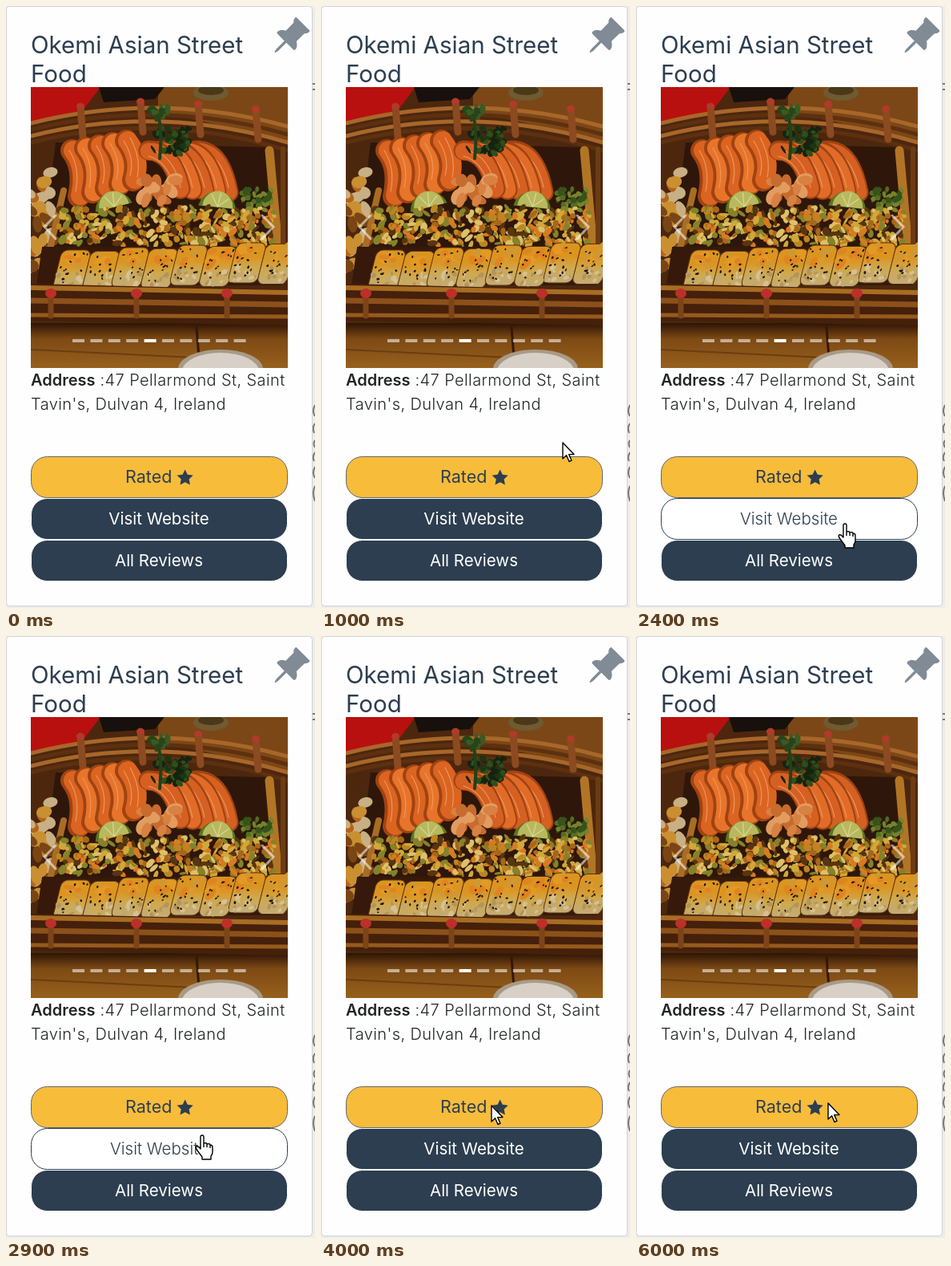
An HTML page for the animation above (7200 ms loop, 386 by 750 pixels).

```html
<!DOCTYPE html>
<html lang="en">
<head>
<meta charset="utf-8">
<title>Restaurant card</title>
<style>
html, body { margin: 0; width: 100%; height: 100%; overflow: hidden; background: #ececec; }
svg { display: block; }
text { font-family: Inter, "Open Sans", sans-serif; font-size: 20.5px; fill: #2c3e50; }
.title { font-size: 29.5px; font-weight: 400; }
.address { font-size: 20px; font-weight: 300; fill: #212529; letter-spacing: .4px; }
.address tspan { font-weight: 600; letter-spacing: 0; }
.btn text { text-anchor: middle; fill: #fff; }
.btn rect { fill: #2c3e50; stroke: #fff; }
.btn.hover text { fill: #2c3e50; font-weight: 300; }
.btn.hover rect { fill: #fff; stroke: #2c3e50; }
</style>
</head>
<body>
<svg width="386" height="750" viewBox="0 0 386 750">
  <defs>
    <clipPath id="frame"><rect x="31" y="101" width="321" height="350"/></clipPath>
    <linearGradient id="table" x2="0" y2="1">
      <stop offset="0" stop-color="#2c1405"/><stop offset=".35" stop-color="#7d4a14"/>
      <stop offset="1" stop-color="#97601c"/>
    </linearGradient>
    <linearGradient id="roll" x2="0" y2="1">
      <stop offset=".35" stop-color="#dc9420"/><stop offset=".62" stop-color="#cfa950"/>
      <stop offset="1" stop-color="#c4ac78"/>
    </linearGradient>
  </defs>

  <path d="M383 97h3M383 104h3M386 497q-4 8 0 14M386 520q-4 5-1 12M386 541q-3 4 0 9M386 556q-4 6-1 11M386 574q-4 8 0 14M386 598q-4 8 0 19"
        fill="none" stroke="#777" stroke-width="2"/>
  <rect x=".5" y=".5" width="382" height="747" rx="4" fill="#fefefe" stroke="#d2d2d2"/>

  <path transform="translate(331.4 11.9) scale(3.14)" fill="#808b96"
        d="M9.8.7Q10 .7 10.2.9L15.1 5.8Q15.4 6.1 15.1 6.5C14.6 7 13.8 7.2 13.2 7.1L10 10.2C10.3 11.2 10.4 12.7 9.5 13.6Q9.1 13.9 8.8 13.6L6 10.8L2.8 14C2.6 14.2 1.6 14.9 1.4 14.7C1.2 14.5 1.9 13.4 2.1 13.2L5.2 10.1L2.4 7.2Q2.1 6.9 2.4 6.5C3.3 5.6 4.8 5.7 5.8 6L8.9 2.8C8.8 2.2 8.9 1.4 9.5.9Q9.6.7 9.8.7Z"/>

  <text class="title" x="31" y="59">Okemi Asian Street</text>
  <text class="title" x="31" y="95">Food</text>

  <g id="photo" clip-path="url(#frame)"></g>
  <g id="controls" fill="#fff"></g>

  <text class="address" x="31" y="473"><tspan>Address</tspan> :47 Pellarmond St, Saint</text>
  <text class="address" x="31" y="503">Tavin's, Dulvan 4, Ireland</text>

  <rect x="31.5" y="561.5" width="320" height="51" rx="20" fill="#f8bc3b" stroke="#5f6670"/>
  <text x="149" y="594" style="font-size:21.5px">Rated</text>
  <path id="star" fill="#2c3e50"/>

  <g class="btn" id="visit">
    <rect x="31.5" y="613.5" width="320" height="51" rx="20"/><text x="191" y="646">Visit Website</text>
  </g>
  <g class="btn" id="reviews">
    <rect x="31.5" y="665.5" width="320" height="51" rx="20"/><text x="191" y="698">All Reviews</text>
  </g>

  <g id="cursor" fill="#fff" stroke="#000" stroke-width="1.4" stroke-linejoin="round">
    <path id="arrow" d="M0 0V20L4.6 15.7L8 23.5L11 22.2L7.7 14.6H14Z"/>
    <path id="hand" d="M1 2Q1 0 3 0T5 2V10Q9 9 9 11Q13 10 13 12Q16 12 16 15V21Q16 24 14 26V30H3V27L-3 19Q-6 15 -4 14Q-2 13 1 17ZM5 10v5M9 11v4M13 12v4"/>
  </g>
</svg>

<script>
const $ = id => document.getElementById(id);
let seed = 7;
const rnd = (a, b) => a + (b - a) * ((seed = seed * 16807 % 2147483647) / 2147483647);
const pick = list => list[Math.floor(rnd(0, list.length))];

const shape = (d, fill) => `<path d="${d}" fill="${fill}"/>`;
const line = (d, color, w, cap = 'round') =>
  `<path d="${d}" fill="none" stroke="${color}" stroke-width="${w}" stroke-linecap="${cap}"/>`;
const oval = (x, y, rx, ry, fill, turn = 0) =>
  `<ellipse cx="${x}" cy="${y}" rx="${rx}" ry="${ry}" fill="${fill}" transform="rotate(${turn} ${x} ${y})"/>`;
const scatter = (n, x0, x1, y0, y1, r0, r1, colors) => {
  let s = '';
  while (n--) s += oval(rnd(x0, x1), rnd(y0, y1), rnd(r0, r1), rnd(r0, r1) * .7, pick(colors), rnd(0, 180));
  return s;
};

function tableAndBoat() {
  let s = shape('M31 101H352V451H31Z', '#4c270e')
    + shape('M190 101H352V170L190 130Z', '#7c4716')
    + shape('M31 101H118L96 130L31 146Z', '#b8100f')
    + shape('M116 101H198L186 116L122 120Z', '#17100d')
    + oval(256, 108, 22, 10, '#6f5a31') + oval(256, 105, 16, 6, '#4a3819');
  for (let i = 0; i < 4; i++)
    s += line(`M31 ${146 + 8 * i}Q190 ${106 + 8 * i} 352 ${150 + 10 * i}`, i % 2 ? '#5d300f' : '#a8672a', 5);
  s += shape('M62 170L326 176L343 345H40Z', '#2e170a')
    + line('M329 180L343 335', '#b27526', 11) + line('M346 178V330', '#6c3c12', 6);
  for (const [x, y] of [[93, 125], [168, 119], [240, 122], [312, 128]])
    s += line(`M${x} ${y}l3 38`, '#8c4a20', 9) + oval(x, y, 5, 4, '#b13a2a');
  s += scatter(26, 30, 58, 200, 335, 7, 13, ['#c98f31', '#b5641a', '#c8b084', '#7a4514']);
  return s + line('M72 230L45 345', '#a86c24', 8);
}

function salmon() {
  let s = '';
  for (let i = 0; i < 5; i++) {
    const x = 82 + 17 * i, y = 180 - 3 * i, low = 57 - 2 * i;
    s += line(`M${x} ${y}q17 22 9 ${low}`, '#a04312', 28)
      + line(`M${x + 2} ${y}q17 22 9 ${low - 1}`, i % 2 ? '#e8742a' : '#db6421', 24)
      + line(`M${x + 5} ${y - 4}q14 25 9 ${low}M${x - 3} ${y}q14 22 8 ${low - 6}`, '#ee965a', 1.2);
  }
  for (let i = 0; i < 5; i++) {
    const x = 280 - 15 * i;
    s += line(`M${x - 42} 180q30 0 40 ${52 - i}`, '#a04312', 25)
      + line(`M${x - 42} 181q30 0 40 ${51 - i}`, i % 2 ? '#e16c28' : '#d56022', 21)
      + line(`M${x - 36} 180q26 8 34 46M${x - 42} 187q24 6 32 40`, '#ee965a', 1.2);
  }
  return s + scatter(16, 168, 212, 215, 244, 7, 12, ['#d78142', '#c76b2f', '#e29c60']);
}

function garnish() {
  let s = scatter(55, 184, 230, 152, 184, 2, 6, ['#1d3514', '#2f4f1c', '#15240f'])
    + line('M188 130q8 20 4 60', '#22401a', 4)
    + scatter(18, 178, 202, 122, 142, 2, 6, ['#27451a', '#385b23'])
    + scatter(30, 296, 334, 228, 250, 3, 6, ['#546d22', '#74832c', '#37521a']);
  for (const [x, turn] of [[134, -12], [265, 8]])
    s += `<g transform="rotate(${turn} ${x} 245)">`
      + shape(`M${x - 24} 252a24 25 0 0 1 47 -2Z`, '#5f7520')
      + shape(`M${x - 19} 251a19 20 0 0 1 38 -1Z`, '#b8b95e')
      + line(`M${x} 250l-9 -14M${x} 250l2 -17M${x} 250l12 -11`, '#d9d494', 1.3) + '</g>';
  return s + scatter(360, 66, 336, 252, 298, 2, 7,
    ['#cfa83a', '#bd8522', '#dcc06a', '#a8661a', '#d97a22', '#84822b', '#57350f']);
}

function rolls() {
  let s = shape('M45 300H345V348H38Z', '#36190a');
  for (let i = 0; i < 8; i++) {
    const x = 64 + 36.5 * i, y = 304 - 1.5 * i + i % 2 * 3;
    s += `<g transform="translate(${x} ${y}) skewX(-14)">`
      + '<rect x="6" width="37" height="50" rx="8" fill="url(#roll)" stroke="#5a3411"/>'
      + scatter(6, 12, 36, 4, 22, 4, 8, ['#e29a25', '#e08420', '#cf9832'])
      + scatter(10, 8, 40, 30, 46, 2, 5, ['#d4c194', '#b3945a', '#c2a96c'])
      + scatter(13, 9, 40, 4, 42, 1, 2, ['#1d1510']) + '</g>';
  }
  return s;
}

function front() {
  let s = shape('M31 395H352V451H31Z', 'url(#table)')
    + shape('M31 346L352 354V398L31 392Z', '#45200a')
    + line('M31 351L352 357', '#a86c22', 6) + line('M31 367L352 372', '#8c511a', 7)
    + line('M31 385L352 387', '#965a1d', 5)
    + line('M238 400L242 451', '#341807', 3) + line('M31 428L235 438', '#6b3d11', 2);
  for (const x of [56, 163, 276]) s += line(`M${x} 362v24`, '#7d4418', 7) + oval(x, 358, 7, 6, '#bd2f29');
  return s + oval(268, 452, 53, 24, '#a89a86') + oval(268, 455, 48, 23, '#d8d0c6');
}

$('photo').innerHTML = tableAndBoat() + salmon() + garnish() + rolls() + front();

let controls = '<g opacity=".55">' + line('M62 261L48 275L62 290M320 261L334 275L320 290', '#fff', 3) + '</g>';
for (let i = 0; i < 10; i++)
  controls += `<rect x="${83 + 22.4 * i}" y="415" width="15" height="4" opacity="${i == 4 ? 1 : .55}"/>`;
$('controls').innerHTML = controls;

$('star').setAttribute('d', 'M' + Array.from({ length: 10 }, (_, i) => {
  const a = Math.PI * (i / 5 - .5), r = i % 2 ? 5.2 : 10.6;
  return `${223.7 + r * Math.cos(a)} ${588 + r * Math.sin(a)}`;
}).join('L') + 'Z');

// Pointer route: time in ms, x, y
const route = [
  [400, 389, 742], [700, 358, 620], [1000, 302, 544], [1200, 298, 556], [1500, 277, 622],
  [1900, 269, 641], [2400, 258, 645], [2900, 242, 622], [3250, 238, 687], [3600, 230, 640],
  [4000, 213, 585], [4300, 213, 585], [4600, 290, 587], [4900, 218, 581], [5200, 262, 586],
  [5500, 240, 582], [7200, 240, 582]
];

function pointer(t) {
  const i = route.findIndex(p => p[0] > t);
  const [t0, x0, y0] = route[i - 1], [t1, x1, y1] = route[i];
  const k = (1 - Math.cos(Math.PI * (t - t0) / (t1 - t0))) / 2;
  return [x0 + (x1 - x0) * k, y0 + (y1 - y0) * k];
}

function draw(now) {
  const t = Math.floor(now % 7200 / 100) * 100;
  const [x, y] = t >= 400 ? pointer(t) : [-99, -99];
  const inside = (top, bottom) => x > 31 && x < 352 && y >= top && y < bottom;
  const visit = inside(613, 665), reviews = inside(665, 717);
  $('visit').classList.toggle('hover', visit);
  $('reviews').classList.toggle('hover', reviews);
  $('arrow').style.display = visit || reviews ? 'none' : '';
  $('hand').style.display = visit || reviews ? '' : 'none';
  $('cursor').setAttribute('transform', `translate(${Math.round(x)} ${Math.round(y)})`);
}

const start = performance.now();
(function tick() {
  draw(performance.now() - start);
  requestAnimationFrame(tick);
})();
</script>
</body>
</html>
```
